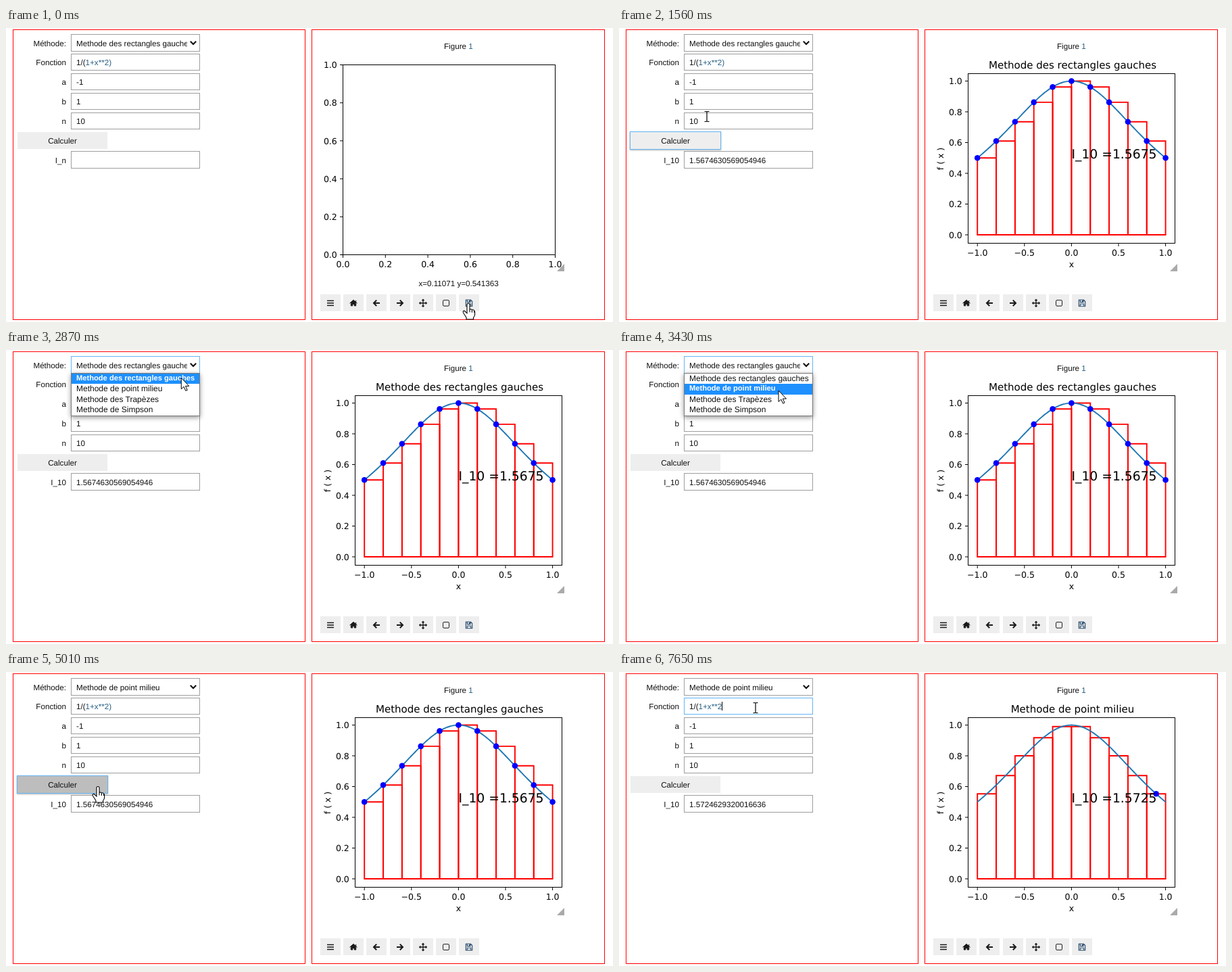
An HTML page for the animation above (8 s loop, 898 px wide and 435 px high).

```html
<!DOCTYPE html>
<html lang="fr">
<head>
<meta charset="utf-8">
<style>
html, body { margin: 0; width: 100%; height: 100%; overflow: hidden; background: #fff; }
svg { display: block; }
body > svg, #list { position: absolute; left: 0; top: 0; }
text, #list { font: 11.65px "Liberation Sans", Arial, sans-serif; fill: #111; color: #111; white-space: pre; text-rendering: geometricPrecision; }
.plot text { font-family: "DejaVu Sans", sans-serif; font-size: 12.5px; fill: #000; }
#list { left: 96px; top: 34px; width: 189px; height: 62px; border: 1px solid #777; box-shadow: 0 2px 7px rgba(0,0,0,.42); font-size: 12px; }
#list div { height: 15.4px; line-height: 15.4px; padding-left: 7px; }
#list .on { background: #1e90ff; color: #fff; font-weight: bold; font-size: 11.15px; }
</style>
</head>
<body>
<svg id="page" width="898" height="435"></svg>
<div id="list"></div>
<svg id="top" width="898" height="435"></svg>
<script>
const $ = id => document.getElementById(id);
const page = $('page'), list = $('list'), over = $('top');
const BLUE = '#64b5f6', GREY = '#9e9e9e', TINT = '#285f85';

function add(parent, tag, attrs = {}, content = '') {
  const el = document.createElementNS('http://www.w3.org/2000/svg', tag);
  for (const k in attrs) el.setAttribute(k, attrs[k]);
  el.textContent = content;
  parent.appendChild(el);
  return el;
}
const text = (p, x, y, s, anchor = 'start', more = {}) =>
  add(p, 'text', { x, y, 'text-anchor': anchor, ...more }, s);
const rect = (p, x, y, width, height, fill = 'none', stroke = 'none') =>
  add(p, 'rect', { x, y, width, height, fill, stroke });
const path = (p, d, stroke = '#000', width = 1, fill = 'none') =>
  add(p, 'path', { d, stroke, fill, 'stroke-width': width });
const show = (el, on) => { el.style.display = on ? '' : 'none'; };

// Panels and form
rect(page, 10.5, 2.5, 432, 429, '#fff', '#f00');
rect(page, 452.5, 2.5, 433, 429, '#fff', '#f00');

const METHODS = ['Methode des rectangles gauches', 'Methode de point milieu', 'Methode des Trapèzes', 'Methode de Simpson'];
const row = (label, y, h, base) => {
  const name = text(page, 89, base, label, 'end');
  return { name, box: rect(page, 96.5, y, 190, h, '#fff', GREY) };
};
const select = row('Méthode:', 9.5, 25, 27);
const clip = add(page, 'svg', { x: 97, y: 10, width: 171, height: 24 });
const method = text(clip, 7, 17, '');
path(page, 'M272.8 19.8L277 24L281.2 19.8', '#111', 2.1);

const formula = row('Fonction', 38.5, 24, 55);
const expr = text(page, 104, 55, '1/(');
const tail = add(expr, 'tspan', { fill: TINT });
[['a', '-1'], ['b', '1'], ['n', '10']].forEach(([name, value], i) => {
  row(name, 67.5 + 29 * i, 24, 84 + 29 * i);
  text(page, 104, 84 + 29 * i, value);
});
const button = rect(page, 17, 154, 133, 25);
text(page, 83.5, 171, 'Calculer', 'middle');
const result = row('I_n', 182.5, 25, 200);
const value = text(page, 104, 200, '');
const caret = rect(page, 156, 44, 1, 13, '#000');

// Figure
const fig = text(page, 648, 31, 'Figure ');
add(fig, 'tspan', { fill: TINT }, '1');
const coords = text(page, 669.5, 382, 'x=0.11071 y=0.541363', 'middle');

function axes(x, y, w, h, xs, ys, xPos, yPos) {
  const g = add(page, 'g', { class: 'plot' });
  const frame = () => {
    rect(g, x, y, w, h, 'none', '#000');
    for (const v of xs) {
      path(g, `M${xPos(v)} ${y + h}v4.5`);
      text(g, xPos(v), y + h + 18, v.toFixed(1).replace('-', '−'), 'middle');
    }
    for (const v of ys) {
      path(g, `M${x} ${yPos(v)}h-4.5`);
      text(g, x - 8.7, yPos(v) + 4.6, v.toFixed(1), 'end');
    }
  };
  return { g, frame };
}
const TICKS = [0, .2, .4, .6, .8, 1];
const empty = axes(498.5, 54.5, 314, 281, TICKS, TICKS, v => 498.5 + 314 * v, v => 335.5 - 281 * v);
empty.frame();

const f = x => 1 / (1 + x * x);
const px = x => 669.4 + 139.2 * x, py = y => 306 - 227.5 * y;

function integral(title, shift, dots, sum) {
  const { g, frame } = axes(516.5, 67.5, 306, 251, [-1, -.5, 0, .5, 1], TICKS, px, py);
  for (let i = 0; i < 10; i++) {
    const a = -1 + .2 * i;
    path(g, `M${px(a)} ${py(0)}V${py(f(a + shift))}H${px(a + .2)}V${py(0)}Z`, '#f00', 1.9);
  }
  let d = '';
  for (let x = -1; x < 1.001; x += .02) d += (d ? 'L' : 'M') + px(x) + ' ' + py(f(x));
  path(g, d, '#1f77b4', 1.9);
  for (const x of dots) add(g, 'circle', { cx: px(x), cy: py(f(x)), r: 4.3, fill: '#00f' });
  frame();
  text(g, 671, 59.5, title, 'middle', { style: 'font-size:15px' });
  text(g, 669.5, 354, 'x', 'middle');
  text(g, 0, 0, 'f ( x )', 'middle', { transform: 'translate(480 193.5) rotate(-90)' });
  text(g, 669.5, 192.5, 'I_10 =' + sum, 'start', { style: 'font-size:18.75px' });
  return g;
}
const left = integral(METHODS[0], 0, Array.from({ length: 11 }, (_, i) => -1 + .2 * i), '1.5675');
const middle = integral(METHODS[1], .1, [.9], '1.5725');
path(page, 'M826 349V360H815Z', 'none', 0, '#aaa');

// Toolbar: path, stroke width, fill
const INK = '#1a1a1a';
[
  ['M-5-3.5H5M-5 0H5M-5 3.5H5', 1.6],
  ['M-5.5.2L0-4.6L5.5.2M3.7-4V-2M-3.7 1L0-2.2L3.7 1V4H1.2V1.5H-1.2V4H-3.7Z', 1, INK],
  ['M5 0H-4M.2-4.2L-4 0L.2 4.2', 2],
  ['M-5 0H4M-.2-4.2L4 0L-.2 4.2', 2],
  ['M-5 0H5M0-5V5M-3.7-1.6L-5.3 0L-3.7 1.6M3.7-1.6L5.3 0L3.7 1.6M-1.6-3.7L0-5.3L1.6-3.7M-1.6 3.7L0 5.3L1.6 3.7', 1.3],
  ['M-3-4.3H3Q4.5-4.3 4.5-2.8V2.8Q4.5 4.3 3 4.3H-3Q-4.5 4.3-4.5 2.8V-2.8Q-4.5-4.3-3-4.3Z', 1],
  ['M-4.7-4.7H2.5L4.7-2.5V4.7H-4.7ZM-2.7-4.5V-1.4H2V-4.5M.6-4V-2M-2.7 4.5V1.3H2.7V4.5', 1.1]
].forEach(([d, w, fill = 'none'], i) => {
  const x = Math.round(465 + 34.2 * i);
  rect(page, x, 394, 30, 25, '#eee');
  path(page, d, i == 6 ? '#23476a' : INK, w, fill).setAttribute('transform', `translate(${x + 15} 407)`);
});

// Drop-down entries
for (const m of METHODS) list.appendChild(document.createElement('div')).textContent = m;

// Pointer
const halo = add(over, 'circle', { r: 11.5, fill: '#ffe600', opacity: .6 });
const pointers = {
  arrow: path(over, 'M0 0V16.5L3.8 13L6.5 19L9 18L6.3 12.1H11.5Z', '#000', 1, '#fff'),
  hand: path(over, 'M-2 14V1.5Q-2-.5 0-.5T2 1.5V8.5Q4 7.3 5.4 9Q8 8.3 8.6 10.2Q9.6 10.8 9.6 12V16Q9.6 18 7.5 20.5V23H-3V20.5Q-5 17-7.5 13.5Q-8.5 11.5-7 10.5Q-5.5 10-3.8 12.3L-2 14ZM2 8V12.5M5.4 9V13M8.6 10.2V13', '#000', 1.1, '#fff'),
  beam: path(over, 'M-3.5-7.5H-1L0-6.7L1-7.5H3.5M0-7V7M-3.5 7.5H-1L0 6.7L1 7.5H3.5', '#000', 1.2)
};
// time, x, y
const KEYS = [
  [50, 684, 408], [480, 101, 163], [1555, 101, 163], [1560, 130, 131], [1610, 130, 131],
  [1850, 245, 72], [2120, 288, 30], [2360, 270, 25], [2640, 270, 25], [3200, 241, 69],
  [3250, 241, 69], [3430, 236, 60], [3840, 236, 60], [4310, 166, 178], [4440, 166, 178],
  [4700, 136, 170], [5900, 136, 170], [6210, 214, 36], [6360, 214, 36], [6520, 202, 53]
];
function pointerAt(t) {
  const i = KEYS.findIndex(k => k[0] > t);
  if (i <= 0) return KEYS[i ? KEYS.length - 1 : 0].slice(1);
  const [t0, x0, y0] = KEYS[i - 1], [t1, x1, y1] = KEYS[i];
  const u = (t - t0) / (t1 - t0), e = u * u * (3 - 2 * u);
  return [x0 + (x1 - x0) * e, y0 + (y1 - y0) * e];
}
const inside = (x, y, x0, y0, x1, y1) => x >= x0 && x <= x1 && y >= y0 && y <= y1;
const during = (t, ...spans) => spans.some(([a, b]) => t >= a && t < b);

function draw(t) {
  const [x, y] = pointerAt(t);
  const open = during(t, [2590, 3800]);
  const hover = inside(x, y, 17, 154, 150, 179);
  const field = !open && [38, 67, 96, 125, 182].some(top => inside(x, y, 96, top, 287, top + 25));
  const kind = hover || inside(x, y, 465, 394, 700, 419) ? 'hand' : field ? 'beam' : 'arrow';
  for (const k in pointers) {
    show(pointers[k], k == kind);
    pointers[k].setAttribute('transform', `translate(${x} ${y})`);
  }
  halo.setAttribute('cx', x);
  halo.setAttribute('cy', y - 1);
  show(halo, during(t, [630, 730], [2410, 2640], [3720, 3840], [4760, 4920], [6520, 6620]));

  select.box.setAttribute('stroke', during(t, [2410, 4800]) ? BLUE : GREY);
  formula.box.setAttribute('stroke', t >= 6560 ? BLUE : GREY);
  method.textContent = METHODS[t < 3800 ? 0 : 1];
  tail.textContent = t < 7550 ? '1+x**2)' : '1+x**2';
  caret.setAttribute('x', t < 7550 ? 156 : 152);
  show(caret, during(t, [6620, 7140], [7650, 8000]));

  const focus = during(t, [910, 2410], [4800, 6560]), grow = focus ? .5 : 0;
  button.setAttribute('x', 17 - grow);
  button.setAttribute('y', 154 - grow);
  button.setAttribute('width', 133 + 2 * grow);
  button.setAttribute('height', 25 + 2 * grow);
  button.setAttribute('fill', during(t, [4800, 5110]) ? '#bdbdbd' : '#eee');
  button.setAttribute('stroke', focus ? BLUE : 'none');
  button.style.filter = focus || hover ? 'drop-shadow(0 1px 1px rgba(0,0,0,.3))' : '';

  result.name.textContent = t < 910 ? 'I_n' : 'I_10';
  value.textContent = t < 910 ? '' : t < 5160 ? '1.5674630569054946' : '1.5724629320016636';
  show(coords, t < 150);
  show(empty.g, t < 1090);
  show(left, during(t, [1090, 5310]));
  show(middle, t >= 5310);

  show(list, during(t, [2460, 3800]));
  list.style.background = open ? '#fff' : 'none';
  list.style.borderColor = open ? '#777' : 'transparent';
  const active = Math.max(0, Math.min(3, Math.floor((y - 35) / 15.4)));
  [...list.children].forEach((el, i) => {
    show(el, open);
    el.className = i == active ? 'on' : '';
  });
}

const start = performance.now();
function tick() {
  draw((performance.now() - start) % 8000);
  requestAnimationFrame(tick);
}
draw(0);
requestAnimationFrame(tick);
</script>
</body>
</html>
```
